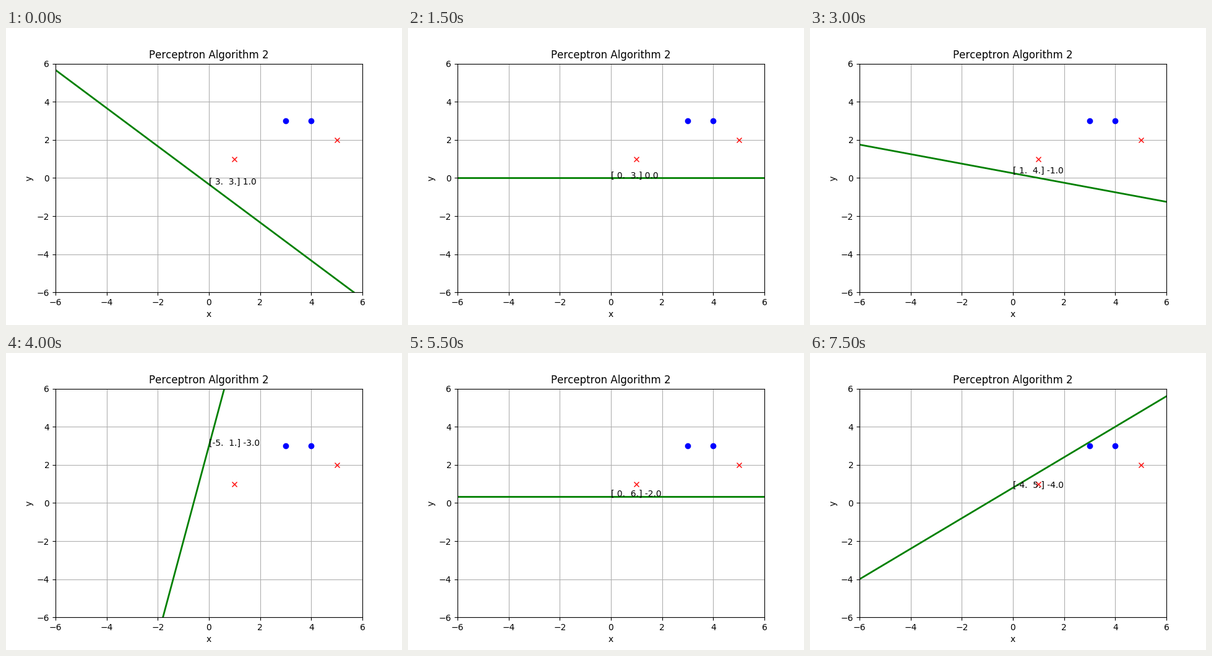
These frames come from a looping animation (640 by 480 pixels, 8000 ms). A matplotlib script:

```python
import numpy as np
import matplotlib.pyplot as plt
from matplotlib.animation import FuncAnimation

STEPS = 16
SAMPLES = [((3, 3), 1), ((4, 3), 1), ((1, 1), -1), ((5, 2), -1)]


def train(steps):
    """Perceptron passes over the samples, recording every update."""
    w, b = np.zeros(2), 0.0
    history = []
    while len(history) < steps:
        updated = False
        for point, sign in SAMPLES:
            if sign * (w @ point + b) <= 0:
                w, b = w + sign * np.array(point), b + sign
                history.append((w, b))
                updated = True
        if not updated:
            break
    return history[:steps]


def drawable(history):
    """Vertical boundaries cannot be drawn as y(x): keep the previous one."""
    shown = []
    for w, b in history:
        shown.append((w, b) if w[1] else shown[-1])
    return shown


states = drawable(train(STEPS))

plt.rcParams["font.family"] = "DejaVu Sans"
plt.rcParams["text.kerning_factor"] = 6
fig, ax = plt.subplots(figsize=(6.4, 4.8), dpi=100)
ax.set(xlim=(-6, 6), ylim=(-6, 6), xlabel="x", ylabel="y",
       title="Perceptron Algorithm 2")
ax.grid(True)

line, = ax.plot([], [], "g", lw=2)
label = ax.text(0, 0, "")
for group, style in ((1, "bo"), (-1, "rx")):
    xs, ys = zip(*[p for p, sign in SAMPLES if sign == group])
    ax.plot(xs, ys, style)


def update(i):
    w, b = states[i % len(states)]
    xs = np.array([-7, 7])
    line.set_data(xs, -(b + w[0] * xs) / w[1])
    label.set_text(f"[{w[0]:2.0f}. {w[1]:2.0f}.] {b:.1f}")
    label.set_position((0, -b / w[1]))
    return line, label


anim = FuncAnimation(fig, update, frames=len(states), interval=500,
                     init_func=lambda: update(0), repeat=True, repeat_delay=0)
plt.show()
```
